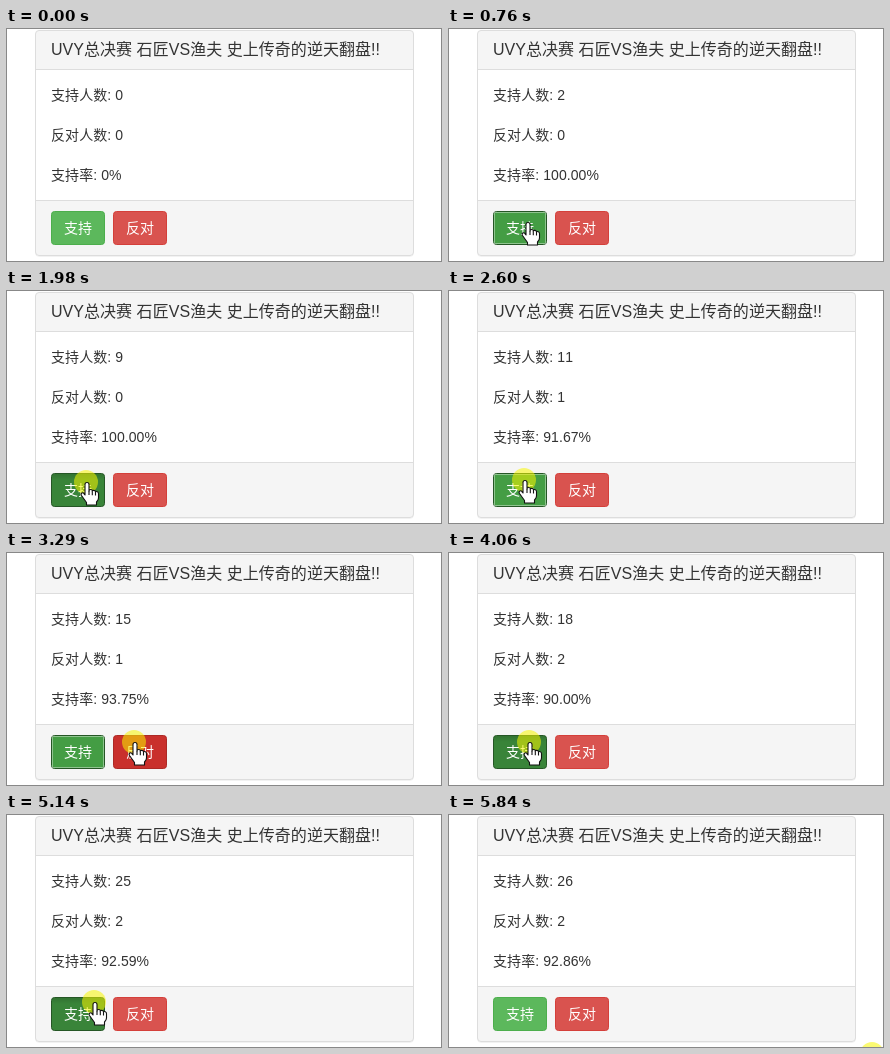
Write an HTML page that moves like this. It is 436 px wide and 234 px high and loops after 5910 ms.

```html
<!DOCTYPE html>
<html lang="zh-CN">
<head>
<meta charset="utf-8">
<title>投票</title>
<style>
html, body { margin: 0; width: 100%; height: 100%; overflow: hidden; background: #fff; }
svg { display: block; }
text { font: 14px "Liberation Sans", Arial, "Noto Sans CJK SC", "Noto Sans CJK", sans-serif; font-kerning: none; letter-spacing: .08px; fill: #333; white-space: pre; }
.title { font-size: 16px; letter-spacing: .04px; }
.btn text { fill: #fff; }
.ring { fill: none; stroke: #fff; stroke-opacity: .8; stroke-dasharray: 1 1; }
</style>
</head>
<body>
<svg width="436" height="234" viewBox="0 0 436 234">
  <defs>
    <linearGradient id="shade" x2="0" y2="1">
      <stop stop-opacity=".13"/><stop offset="1" stop-opacity="0"/>
    </linearGradient>
  </defs>
  <rect x="29.5" y="3.5" width="378" height="225" rx="3.5" fill="none" stroke="#000" stroke-opacity=".05"/>
  <rect x="29.5" y="2.5" width="378" height="225" rx="3.5" fill="#f5f5f5" stroke="#ddd"/>
  <path d="M30 41.5H407V172.5H30Z" fill="#fff"/>
  <path d="M30 41.5H407M30 172.5H407" stroke="#ddd"/>
  <text class="title" x="45" y="27">UVY总决赛 石匠VS渔夫 史上传奇的逆天翻盘!!</text>
  <text id="yes" x="45" y="72"></text>
  <text id="no" x="45" y="112"></text>
  <text id="rate" x="45" y="152"></text>
  <g class="btn" id="green" transform="translate(45 183)">
    <rect class="face" x=".5" y=".5" width="53" height="33" rx="3"/>
    <rect class="dip" x="1" y="1" width="52" height="6" rx="3" fill="url(#shade)"/>
    <rect class="ring" x="1.5" y="1.5" width="51" height="31"/>
    <text x="13" y="22">支持</text>
  </g>
  <g class="btn" id="red" transform="translate(107 183)">
    <rect class="face" x=".5" y=".5" width="53" height="33" rx="3"/>
    <rect class="dip" x="1" y="1" width="52" height="6" rx="3" fill="url(#shade)"/>
    <rect class="ring" x="1.5" y="1.5" width="51" height="31"/>
    <text x="13" y="22">反对</text>
  </g>
  <g id="pointer">
    <circle id="spot" r="12" fill="#f8f500" fill-opacity=".55"/>
    <path id="arrow" d="M0 0V16L3.7 12.6 6.2 18.2 8.6 17.2 6.1 11.7H11Z" fill="#fff" stroke="#111"/>
    <g id="hand" transform="translate(1 1)" stroke="#111" stroke-width="1.1" stroke-linejoin="round">
      <path fill="#fff" d="M-2 1.5Q-2-.5 0-.5T2 1.5V8Q2 6.5 3.7 6.5T5.3 8.2Q5.5 7.2 7 7.4T8.5 9Q9 8.3 10.3 8.7T11.5 10.8V15Q11.5 17 9.5 19V22H-.5V19.5L-5.5 12.5Q-6.5 10.8-5 10T-2.7 11.2L-2 12Z"/>
      <path d="M2 8V12M5.3 8.2V12.3M8.5 9V12.6"/>
    </g>
  </g>
  <rect x=".5" y=".5" width="435" height="233" fill="none" stroke="#888"/>
</svg>
<script>
const $ = id => document.getElementById(id);
const LOOP = 5910, START = 143, STEP = 76.7, LAST = 74;

// Pointer path: step, x, y
const path = [
  [1, 228, 215], [5, 78, 194], [17, 81, 194], [26, 80, 192], [28, 126, 192],
  [30, 126, 192], [32, 76, 190], [39, 78, 190], [40, 79, 190], [42, 128, 190],
  [43, 128, 190], [45, 80, 190], [52, 81, 190], [66, 88, 188], [67, 88, 188],
  [72, 429, 223], [73, 470, 245], [LAST, 424, 240]
];

// [normal, hover or focus, pressed] as [fill, border]
const colors = {
  green: [['#5cb85c', '#4cae4c'], ['#449d44', '#398439'], ['#398439', '#255625']],
  red: [['#d9534f', '#d43f3a'], ['#c9302c', '#ac2925'], ['#ac2925', '#761c19']]
};

// The button pressed during a step, if any
function pressed(k) {
  if (k === 29 || k === 42) return 'red';
  const even = k % 2 === 0;
  if (even && (k >= 6 && k <= 26 || k >= 46 && k <= 66)) return 'green';
  if (!even && k >= 33 && k <= 39) return 'green';
}

function position(k) {
  const i = Math.max(1, path.findIndex(p => p[0] >= k));
  const a = path[i - 1], b = path[i], u = (k - a[0]) / (b[0] - a[0]);
  return [1, 2].map(n => Math.round(a[n] + (b[n] - a[n]) * u));
}

function under(x, y) {
  if (y < 183 || y >= 217) return;
  if (x >= 45 && x < 99) return 'green';
  if (x >= 107 && x < 161) return 'red';
}

const show = (el, on) => el.setAttribute('visibility', on ? 'visible' : 'hidden');

function paint(id, hover, focus, down) {
  const [face, dip, ring] = $(id).querySelectorAll('rect');
  const set = colors[id], [fill, border] = set[down ? 2 : hover || focus ? 1 : 0];
  face.setAttribute('fill', fill);
  face.setAttribute('stroke', focus ? set[2][1] : border);
  show(dip, down);
  show(ring, focus && !down);
}

function draw(k) {
  const votes = { green: 0, red: 0 };
  let focus;
  for (let i = 1; i < k; i++) {
    const id = pressed(i);
    if (id) { votes[id]++; focus = id; }
  }
  const total = votes.green + votes.red;
  $('yes').textContent = '支持人数: ' + votes.green;
  $('no').textContent = '反对人数: ' + votes.red;
  $('rate').textContent = '支持率: ' + (total ? (votes.green / total * 100).toFixed(2) : 0) + '%';

  const [x, y] = position(k), over = k > 0 && under(x, y), press = pressed(k);
  if (focus === 'red' && over !== 'red') focus = 'green';
  if (press === 'green') focus = press;
  if (k === LAST) focus = null; // a click outside drops the focus
  for (const id of ['green', 'red'])
    paint(id, over === id, focus === id, press === id && id === 'green' && k % 2 === 0);

  $('pointer').setAttribute('transform', `translate(${x} ${y})`);
  show($('spot'), press || k === LAST);
  show($('hand'), over);
  show($('arrow'), k > 0 && !over);
}

const t0 = performance.now();
function tick() {
  const t = (performance.now() - t0) % LOOP;
  const k = t < 150 ? 0 : t >= 5840 ? LAST : Math.min(LAST - 1, 1 + Math.floor((t - START) / STEP));
  draw(k);
  requestAnimationFrame(tick);
}
tick();
</script>
</body>
</html>
```
